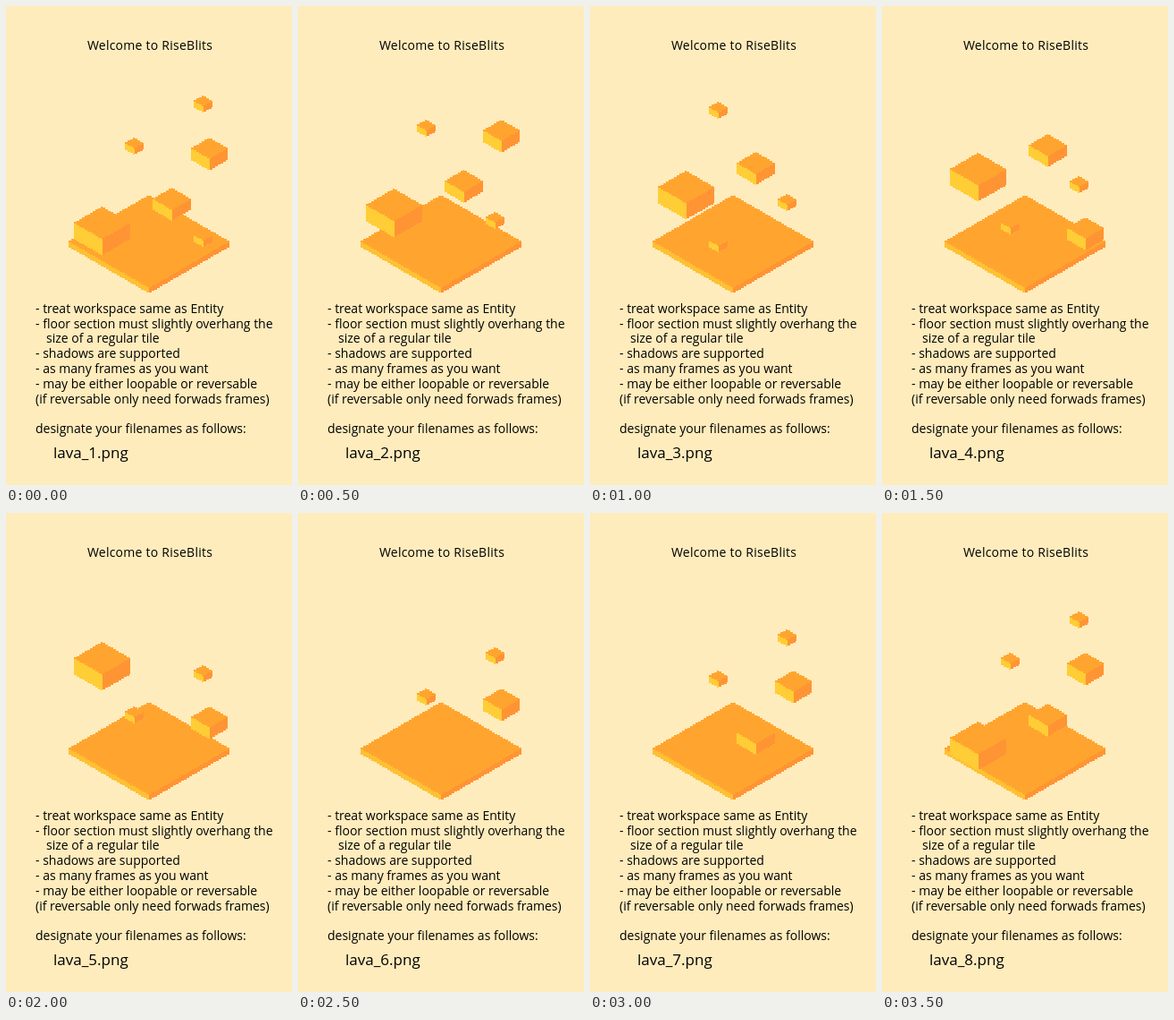
Recreate the animation shown at these times as an HTML page with a canvas. Size 320 by 535 pixels, loop 4 s.

```html
<!DOCTYPE html>
<html lang="en">
<head>
<meta charset="utf-8">
<title>Floating lava tile</title>
<style>
  html, body { margin: 0; width: 100%; height: 100%; overflow: hidden; background: #ffecbd; }
  canvas, svg { position: absolute; left: 0; top: 0; width: 320px; height: 535px; }
  text { font: 14px "Open Sans", "Noto Sans", sans-serif; fill: #000; white-space: pre; }
  #title { text-anchor: middle; letter-spacing: 0.25px; }
  #file { font-size: 17px; font-weight: 500; }
</style>
</head>
<body>
<canvas id="stage" width="320" height="535"></canvas>
<svg viewBox="0 0 320 535">
  <text id="title" x="161" y="49">Welcome to RiseBlits</text>
  <text x="33" y="343">- treat workspace same as Entity</text>
  <text x="33" y="360">- floor section must slightly overhang the</text>
  <text x="45" y="376">size of a regular tile</text>
  <text x="33" y="393">- shadows are supported</text>
  <text x="33" y="410">- as many frames as you want</text>
  <text x="33" y="427">- may be either loopable or reversable</text>
  <text x="33" y="444">(if reversable only need forwads frames)</text>
  <text x="33" y="477">designate your filenames as follows:</text>
  <text id="file" x="53" y="505">lava_1.png</text>
</svg>
<script>
const ctx = document.getElementById('stage').getContext('2d');
const fileLabel = document.getElementById('file');

const STEP_MS = 500, STEPS = 8;
const RISE = 20, LOOP_RISE = 9.5; // the step across the loop point is shorter
const SLOPE = Math.tan(Math.PI / 6);
const COLUMN = 3;
const TOP = '#ffa52f', LEFT = '#ffcd35', RIGHT = '#ff9434', FLOOR_LEFT = '#ffc033';

// y is the back corner at step 0; each block lives from step `from` to `to`
const blocks = [
  { x: 76, width: 63, depth: 18, y: 223.9, from: -1, to: 4 },
  { x: 133, width: 21, depth: 7, y: 146.6, from: -6, to: 2 },
  { x: 164, width: 43, depth: 12, y: 203.4, from: -2, to: 3 },
  { x: 210, width: 21, depth: 7, y: 100.1, from: -8, to: 0 },
  { x: 207, width: 41, depth: 13, y: 146.6, from: -5, to: 1 }
];

// Isometric box made of narrow columns, which gives stepped edges
function drawBox({ x, width, depth }, y, leftColor = LEFT) {
  const seam = Math.ceil(width / 2);
  const drawColumns = (from, to, sideColor) => {
    for (let left = from; left < to; left += COLUMN) {
      const w = Math.min(COLUMN, to - left);
      const inset = Math.abs(left + w / 2 - width / 2) * SLOPE;
      const back = Math.round(y + inset);
      const front = Math.round(y + width * SLOPE - inset);
      ctx.fillStyle = TOP;
      ctx.fillRect(x + left, back, w, front - back);
      ctx.fillStyle = sideColor;
      ctx.fillRect(x + left, front, w, depth);
    }
  };
  drawColumns(0, seam, leftColor);
  drawColumns(seam, width, RIGHT);
}

function drawBlock(block, step) {
  if (step < block.from || step > block.to) return;
  const y = block.y - RISE * step - (step < 0 ? RISE - LOOP_RISE : 0);
  drawBox(block, Math.round(y));
}

function draw(step) {
  ctx.fillStyle = '#ffecbd';
  ctx.fillRect(0, 0, 320, 535);
  drawBox({ x: 70, width: 180, depth: 6 }, 211, FLOOR_LEFT);
  for (const block of blocks) {
    drawBlock(block, step);
    drawBlock(block, step - STEPS);
  }
  fileLabel.textContent = `lava_${step + 1}.png`;
}

let shown = -1;
const start = performance.now();
function tick() {
  const step = Math.floor((performance.now() - start) / STEP_MS) % STEPS;
  if (step !== shown) draw(shown = step);
  requestAnimationFrame(tick);
}
tick();
</script>
</body>
</html>
```
